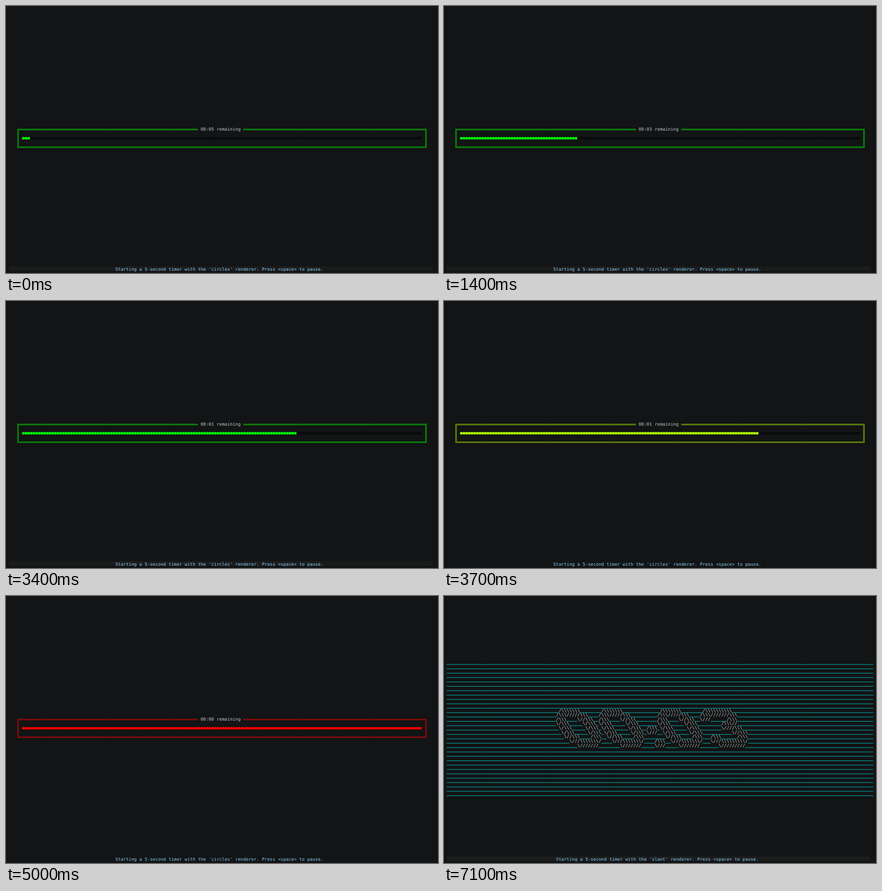
These frames come from a looping animation (951 by 589 pixels, 8000 ms). An HTML page with a canvas:

```html
<!DOCTYPE html>
<html lang="en">
<head>
<meta charset="utf-8">
<title>Terminal timer</title>
<style>
html, body { margin: 0; width: 100%; height: 100%; overflow: hidden; background: #121415; }
canvas { display: block; }
</style>
</head>
<body>
<canvas id="stage" width="951" height="589"></canvas>
<script>
const ctx = document.getElementById('stage').getContext('2d');
const LOOP = 8000, CELL = 5.868, ROW = 9.652, DOTS = 150;
const BG = '#121415', GREY = '#c6c8c8', BLUE = '#87cefa', CYAN = '#00c4c4';
const LINE_TOP = 150.5, ART_BASE = 255.5, TITLE_BASE = 275.2, STATUS_BASE = 584;
const colX = col => 6 + col * CELL;
const seams = Array.from({ length: 7 }, (_, k) => colX(Math.floor(13 + 24.4 * k)));

// Slanted lettering: underscores are gaps, each glyph has its own left column.
const rows = text => text.split('\n').slice(1, 10);
const ZERO = rows(String.raw`
_/\\\\\\\
/\\\/////\\\
/\\\____\//\\\
\/\\\_____\/\\\
_\/\\\_____\/\\\
__\/\\\_____\/\\\
___\//\\\____/\\\
_____\///\\\\\\\/
________\///////
`);
const COLON = rows(String.raw`




/\\\
\///

___/\\\
___\///
`);
const FIVE = rows(String.raw`
/\\\\\\\\\\\\\\\
\/\\\///////////
_\/\\\
__\/\\\\\\\\\\\\
___\////////////\\\
_______________\//\\\
_____/\\\________\/\\\
_____\//\\\\\\\\\\\\\/
_______\/////////////
`);
const FOUR = rows(String.raw`
_________/\\\
________/\\\\\
_______/\\\/\\\
______/\\\/\/\\\
_____/\\\/__\/\\\
____/\\\\\\\\\\\\\\\\
____\///////////\\\//
_______________\/\\\
________________\///
`);
const THREE = rows(String.raw`
__/\\\\\\\\\\
_/\\\///////\\\
_\///______/\\\
_________/\\\//
_________\////\\\
_____________\//\\\
_____/\\\______/\\\
_____\///\\\\\\\\\/
________\/////////
`);

function rect(x, y, w, h, color) {
  ctx.fillStyle = color;
  ctx.fillRect(x, y, w, h);
}

// Text sits on the terminal's column grid.
function text(str, col, y, color) {
  ctx.fillStyle = color;
  [...str].forEach((ch, i) => {
    if (ch !== ' ' && ch !== '_') ctx.fillText(ch, colX(col + i), y);
  });
}

function seam(y, h) {
  ctx.globalAlpha = 0.4;
  for (const x of seams) rect(Math.floor(x), y, 1, h, BG);
  ctx.globalAlpha = 1;
}

function status(renderer, col, bar) {
  if (bar) rect(6, 574, 933, 10, '#1b1c1c');
  text(`Starting a 5-second timer with the '${renderer}' renderer. Press <space> to pause.`,
    col, STATUS_BASE, BLUE);
}

function frame(color) {
  ctx.globalAlpha = 0.78;
  for (const inset of [0, 2]) {
    const left = 25 + inset, right = 925 - inset, top = 271 + inset, bottom = 312 - inset;
    rect(left, top, colX(71) - left, 1, color);
    rect(colX(88), top, right + 1 - colX(88), 1, color);
    rect(left, bottom, right + 1 - left, 1, color);
    rect(left, top + 1, 1, bottom - top - 1, color);
    rect(right, top + 1, 1, bottom - top - 1, color);
  }
  ctx.globalAlpha = 1;
  seam(271, 3);
  seam(310, 3);
}

function circles(t) {
  const tick = Math.min(50, Math.floor(t / 100));
  const progress = (tick + 1) / 51;
  const filled = Math.round(progress * DOTS);
  const color = progress > 0.9 ? '#ff0000' : progress > 0.7 ? '#b2ff00' : '#00ff00';
  frame(color);
  text(`00:0${Math.floor(5 - tick / 10)} remaining`, 72, TITLE_BASE, GREY);
  for (let i = 0; i < DOTS; i++) {
    ctx.fillStyle = i < filled ? color : '#08090a';
    ctx.beginPath();
    ctx.arc(colX(5.5 + i), 291.8, 3, 0, 7);
    ctx.fill();
  }
  status('circles', 40, progress <= 0.7);
}

function slant(t) {
  const digit = t < 6200 ? FIVE : t < 7100 ? FOUR : THREE;
  const glyphs = [[41, ZERO], [57, ZERO], [75, COLON], [79, ZERO], [94, digit]];
  for (let i = 0; i <= 30; i++) {
    const y = LINE_TOP + i * ROW;
    rect(6, y, 160 * CELL, 1, CYAN);
    seam(y, 1);
  }
  glyphs.forEach(([col, art]) => art.forEach((line, r) => {
    for (const run of line.matchAll(/[^_]+/g)) {
      rect(colX(col + run.index), LINE_TOP + (11 + r) * ROW - 1, run[0].length * CELL, 3, BG);
    }
  }));
  glyphs.forEach(([col, art]) =>
    art.forEach((line, r) => text(line, col, ART_BASE + r * ROW, GREY)));
  status('slant', 41, true);
}

function draw(now) {
  const t = now % LOOP;
  rect(0, 0, 951, 589, BG);
  ctx.font = '9.747px "DejaVu Sans Mono", monospace';
  ctx.textRendering = 'geometricPrecision';
  if (t < 5990) circles(t);
  else slant(t);
}

const start = performance.now();
function loop() {
  draw(performance.now() - start);
  requestAnimationFrame(loop);
}
loop();
</script>
</body>
</html>
```
